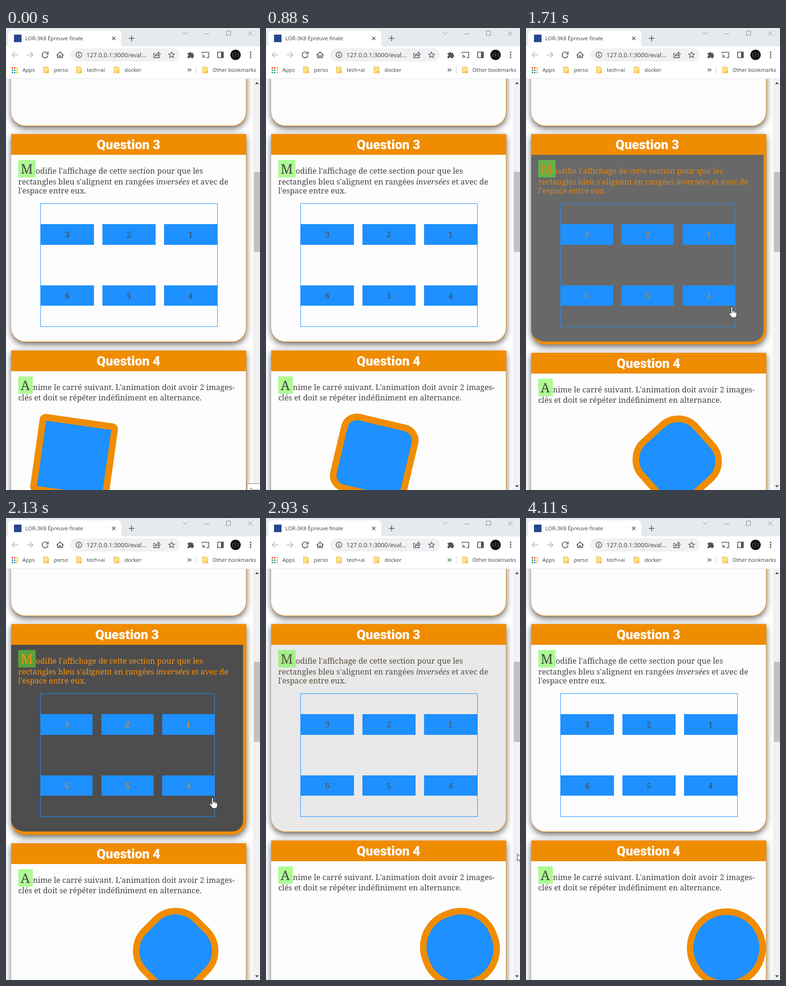
Recreate the animation shown at these times as an HTML page. Size 540 by 980 pixels, loop 4180 ms.

```html
<!DOCTYPE html>
<html lang="fr">
<head>
<meta charset="utf-8">
<title>Épreuve finale</title>
<style>
  html, body { margin: 0; width: 100%; height: 100%; overflow: hidden; background: #fff; }
  #stage { position: absolute; left: 0; top: 0; width: 540px; height: 980px; overflow: hidden; background: #fff;
    --orange: #f08c00; --blue: #1e90ff; }
  .card { position: absolute; left: 11px; width: 500px; box-sizing: border-box; background: #fdfdfd; color: #444;
    border: solid var(--orange); border-width: 0 1px 1px 0; border-radius: 0 0 30px 30px;
    box-shadow: 0 5px 14px rgba(0, 0, 0, .6); }
  .card h2 { margin: 0; height: 44px; font: 900 27.7px/46px Roboto, sans-serif; text-align: center;
    color: #fff; background: var(--orange); }
  .text { position: absolute; left: 0; top: 0; width: 499px; height: 130px; fill: currentColor;
    font: 16.5px "Noto Serif", serif; }
  .text .cap { font-size: 28px; }
  .text rect { fill: rgba(99, 247, 47, .5); }
  .flex { position: absolute; top: 147.1px; left: 12.5%; width: 75%; height: 259.6px; margin-left: -.1px;
    border: 1px solid var(--blue);
    display: flex; flex-flow: row-reverse wrap; justify-content: space-between; align-content: space-around; }
  .flex div { width: 30%; height: 43.2px; background: var(--blue); text-align: center;
    font: 16.5px/44px "Noto Serif", serif; }
  #square { position: absolute; left: 0; top: 144px; width: 168px; height: 168px; box-sizing: border-box;
    background: var(--blue); border: 14px solid var(--orange); }
  .over { position: absolute; left: 0; top: 0; }
  .ui { font-family: "Open Sans", sans-serif; fill: #3c4043; }
  .line { fill: none; stroke: #50555a; stroke-width: 1.7; }
</style>
</head>
<body>
<div id="stage">
  <div class="card" style="top:60px;height:148px"></div>

  <div class="card" id="third" style="top:225px">
    <h2>Question 3</h2>
    <svg class="text">
      <rect x="15" y="55" width="37" height="37"/>
      <text class="cap" x="20" y="84">M</text>
      <text x="52" y="84">odifie l'affichage de cette section pour que les</text>
      <text x="15" y="107">rectangles bleu s'alignent en rangées <tspan font-style="italic">inversées</tspan> et avec de</text>
      <text x="15" y="126">l'espace entre eux.</text>
    </svg>
    <div class="flex"><div>1</div><div>2</div><div>3</div><div>4</div><div>5</div><div>6</div></div>
  </div>

  <div class="card" id="fourth" style="height:460px">
    <h2>Question 4</h2>
    <svg class="text">
      <rect x="15" y="55" width="31" height="37"/>
      <text class="cap" x="20" y="84">A</text>
      <text x="46" y="84">nime le carré suivant. L'animation doit avoir 2 images-</text>
      <text x="15" y="106">clés et doit se répéter indéfiniment en alternance.</text>
    </svg>
    <div id="square"></div>
  </div>

  <svg class="over ui" width="540" height="980">
    <!-- scrollbar -->
    <path d="M525 108h15v872h-15z" fill="#f1f1f1"/>
    <path d="M527 305h13v170h-13z" fill="#c1c1c1"/>
    <path d="M529.5 119l4-4.5 4 4.5zM529.5 970l4 4.5 4-4.5z" fill="#505050"/>

    <!-- title bar and tab -->
    <path d="M0 0h540v40H0z" fill="#e7eaed"/>
    <path d="M0 39h540v69H0z" fill="#fff"/>
    <path d="M0 107.5h540" stroke="#e3e5e8"/>
    <path d="M0 39q5 0 5-6V13q0-8 8-8h224q8 0 8 8v20q0 6 6 6z" fill="#fff"/>
    <path d="M17 14h16v16H17z" fill="#24478f"/>
    <text x="41" y="26" font-size="11.3">LOR-3K8 Épreuve finale</text>
    <path class="line" d="M225.5 18.5l7 7m0-7l-7 7M261 22h12m-6-6v12" style="stroke-width:1.5"/>
    <path d="M376 8.5l5 5 5-5M422 12.5h10M468.5 6.5h9v9h-9zM514 6.5l10 10m0-10l-10 10" fill="none" stroke="#85888c"/>

    <!-- toolbar -->
    <path class="line" d="M26 57H13m6-6l-6 6 6 6M44 57h13m-6-6l6 6-6 6" style="stroke:#b5b8bc"/>
    <path class="line" d="M88 53a6.3 6.3 0 1 0 1.4 5M89.5 50v5h-5M107.5 58l7.5-7 7.5 7M110 56.5V63h3.5v-4h3v4h3.5v-6.5"/>
    <rect x="137" y="43" width="233" height="28" rx="14" fill="#eff1f3"/>
    <circle class="line" cx="155" cy="57" r="6" style="stroke-width:1.4"/>
    <path d="M154.3 56h1.5v4.5h-1.5zM154.3 53.3h1.5v1.5h-1.5z"/>
    <text x="171" y="62" font-size="13">127.0.0.1:3000/eval...</text>
    <path class="line" style="stroke-width:1.3" d="M317 54h-3v9h12v-3M317 60q1-6 7-6v-3l4 4.5-4 4.5v-3q-4 0-7 3z"/>
    <path class="line" style="stroke-width:1.3" d="M352 51l1.8 4 4.4.4-3.3 2.9 1 4.3-3.9-2.3-3.9 2.3 1-4.3-3.3-2.9 4.4-.4z"/>
    <path fill="#50555a" d="M386 53h4a2 2 0 0 1 4 0h4v4a2 2 0 0 1 0 4v3h-4a2 2 0 0 0-4 0h-4v-4a2 2 0 0 0 0-4z"/>
    <path class="line" style="stroke-width:1.5" d="M417 54v-2.5h14v11.5h-5M417 57.5a5.5 5.5 0 0 1 5.5 5.5M417 60.5a2.5 2.5 0 0 1 2.5 2.5"/>
    <path class="line" d="M450 51h12v12h-12z"/>
    <path d="M457 51h5v12h-5z" fill="#50555a"/>
    <circle cx="488" cy="57" r="11" fill="#151515"/>
    <path d="M482 53v8m6-10v10m6-8v8" stroke="#454545" stroke-width="2"/>
    <path d="M520 52v.01M520 57v.01M520 62v.01" stroke="#50555a" stroke-width="3.4" stroke-linecap="round"/>

    <!-- bookmarks -->
    <g id="dots"></g>
    <g id="folders"></g>
    <g font-size="11.3">
      <text x="35" y="93">Apps</text>
      <text x="102" y="93">perso</text>
      <text x="172" y="93">tech+ai</text>
      <text x="252" y="93">docker</text>
      <text x="439" y="93">Other bookmarks</text>
    </g>
    <path class="line" style="stroke-width:1.4" d="M386.5 86l3 3-3 3m4-6l3 3-3 3"/>
    <path d="M404.5 81v16" stroke="#ccc"/>

    <g id="tip">
      <path d="M512.5 966.5h30v20h-30z" fill="#fff" stroke="#808080"/>
      <text x="518" y="984" font-size="11" fill="#666">Rec</text>
    </g>

    <g id="arrow" fill="#fff" stroke="#222">
      <path d="M.5.5v15.5l3.6-3.4 2.6 6 2.6-1.1-2.6-5.9h4.8z"/>
    </g>
    <g id="hand" fill="#fff" stroke="#222">
      <path d="M-2 1.5q0-1.7 1.6-1.7T1.2 1.5V8q3-1.3 3.3.8 2.7-.7 3 1.2 2.5-.3 2.5 2v4q0 3-2.5 6.5H-.5q-1.5-3.5-4.5-6.5-3-4 0-4.3l3 2.3z"/>
      <path d="M1.2 8v4M4.5 9v3.5M7.5 10v3" fill="none"/>
    </g>
  </svg>
</div>

<script>
const $ = id => document.getElementById(id);
const LOOP = 4180, STEP = LOOP / 61;

const dotColors = ['#ea4335', '#ea4335', '#fbbc05', '#34a853', '#4285f4', '#fbbc05', '#34a853', '#4285f4', '#fbbc05'];
$('dots').innerHTML = dotColors.map((c, i) =>
  `<rect x="${12 + i % 3 * 5}" y="${83 + Math.floor(i / 3) * 5}" width="3" height="3" fill="${c}"/>`).join('');
$('folders').innerHTML = [79, 149, 229, 417].map(x =>
  `<path d="M${x + .5} 82.5h9v2h2v11h-11z" fill="#ffe08a" stroke="#e9b949"/>
   <path d="M${x + 7} 91h5v5h-5z" fill="#f3c04b"/>`).join('');

// CSS-like cubic-bezier timing
function bezier(x1, y1, x2, y2) {
  const at = (a, b, s) => 3 * a * s * (1 - s) ** 2 + 3 * b * s * s * (1 - s) + s ** 3;
  return x => {
    if (x <= 0) return 0;
    if (x >= 1) return 1;
    let lo = 0, hi = 1;
    for (let i = 0; i < 30; i++) {
      const mid = (lo + hi) / 2;
      if (at(x1, x2, mid) < x) lo = mid; else hi = mid;
    }
    return at(y1, y2, lo);
  };
}
const ease = bezier(.25, .1, .25, 1);
const easeInOut = bezier(.42, 0, .58, 1);

// linear interpolation through rows of [key, ...values]
function track(rows, k) {
  const i = rows.findIndex(r => r[0] > k);
  if (i === 0) return rows[0].slice(1);
  if (i < 0) return rows[rows.length - 1].slice(1);
  const a = rows[i - 1], b = rows[i], f = (k - a[0]) / (b[0] - a[0]);
  return a.slice(1).map((v, j) => v + (b[j + 1] - v) * f);
}
const mix = (a, b, f) => `rgb(${a.map((v, i) => Math.round(v + (b[i] - v) * f))})`;

// progress, angle
const spin = [[0, -8], [.407, 284], [.6, 437], [1, 730]];

// time, x, y
const pointer = [[1230, 545, 715], [1300, 526, 684], [1440, 490, 637], [1570, 460, 610], [1710, 438, 592],
  [2300, 440, 594], [2560, 492, 636], [2670, 516, 658], [2940, 533, 710], [3080, 548, 740]];

function render(t) {
  const hover = t < 2000 ? ease((t - 1440) / 500) : 1 - ease((t - 2680) / 440);
  const edge = Math.floor(1 + 6 * hover);
  const third = $('third').style;
  third.height = 440 + edge + 'px';
  third.borderWidth = `0 ${edge}px ${edge}px 0`;
  third.background = mix([253, 253, 253], [77, 77, 77], hover);
  third.color = mix([68, 68, 68], [250, 145, 10], hover);
  $('fourth').style.top = 683 + edge + 'px';

  const p = easeInOut((t + 1335) / 5000);
  const [angle] = track(spin, p);
  const square = $('square').style;
  square.transform = `translateX(${1 + 330 * p}px) rotate(${angle}deg)`;
  square.borderRadius = 50 * p + '%';

  const [x, y] = track(pointer, t);
  const inside = x < 511;
  const shown = t > 1230 && t < 3080;
  for (const [id, on] of [['arrow', !inside], ['hand', inside]]) {
    $(id).setAttribute('transform', `translate(${x} ${y})`);
    $(id).style.display = shown && on ? '' : 'none';
  }
  $('tip').style.display = t < STEP ? '' : 'none';
}

function tick() {
  const t = performance.now() % LOOP;
  render(Math.min(60, Math.floor((t + 20) / STEP)) * STEP);
  requestAnimationFrame(tick);
}
tick();
</script>
</body>
</html>
```
